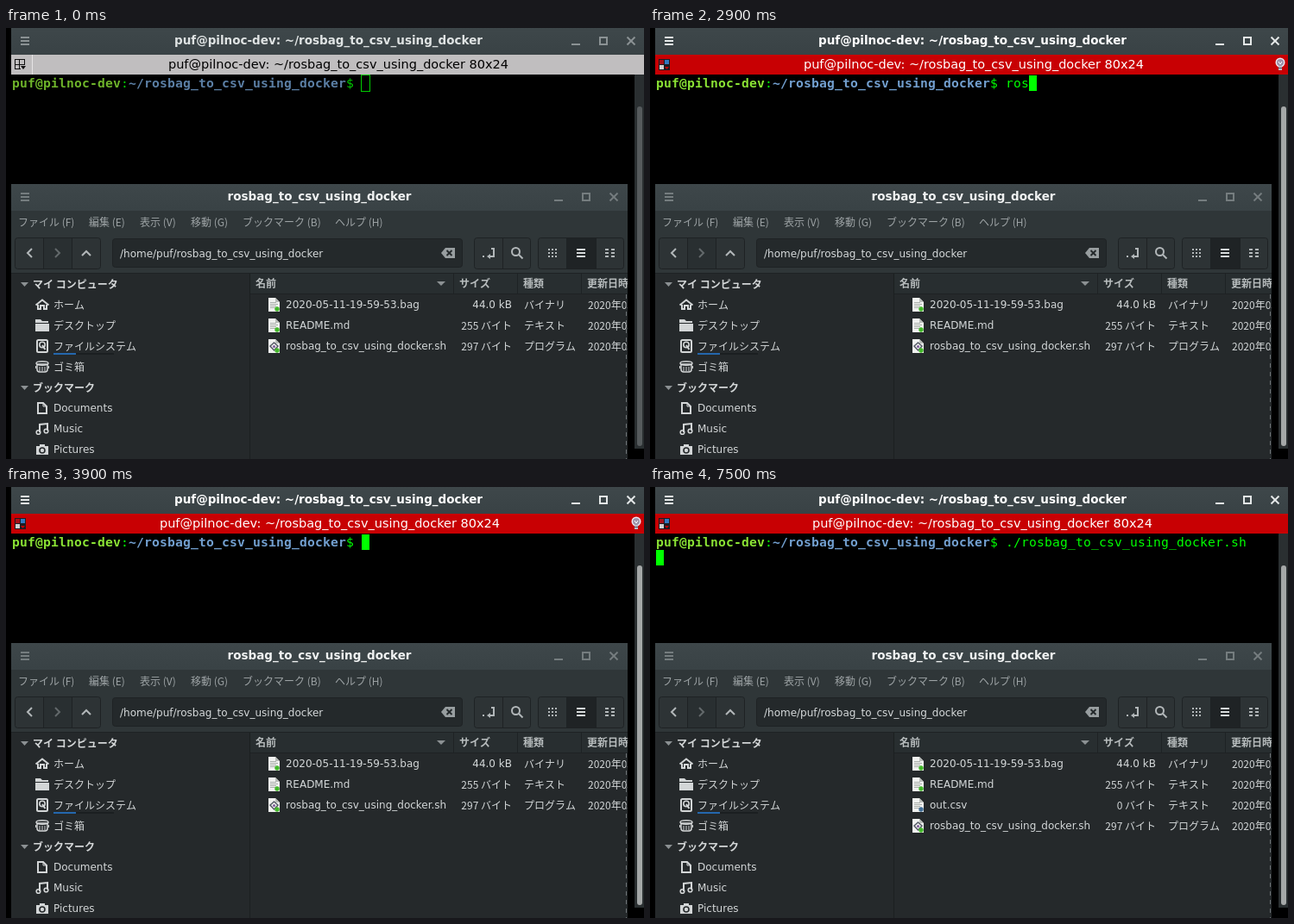
An HTML page with a canvas that plays this animation: 739x500 px, repeating every 8000 ms.

```html
<!DOCTYPE html>
<html lang="ja">
<head>
<meta charset="utf-8">
<title>Terminal and file manager</title>
<style>
html, body { margin: 0; width: 100%; height: 100%; overflow: hidden; background: #000; }
canvas { display: block; width: 739px; height: 500px; }
</style>
</head>
<body>
<canvas id="stage" width="739" height="500"></canvas>
<script>
const ctx = document.getElementById('stage').getContext('2d', { alpha: false });
const LOOP = 8000;
const SANS = '"DejaVu Sans", sans-serif';
const CJK = '"Noto Sans CJK JP", "Noto Sans CJK", sans-serif';
const MONO = '"DejaVu Sans Mono", monospace';
const DIR = 'rosbag_to_csv_using_docker';
const USER = 'puf', HOST = USER + '@pilnoc-dev';
const COMMAND = './' + DIR + '.sh ';
const CELL = 9, ROW = 18, TERM_X = 7, TERM_Y = 55;

const typed = [[0, ''], [2100, 'ro'], [2300, 'ros'], [3500, 'ro'], [3700, 'r'], [3800, ''],
  [4100, '.'], [4500, './'], [5000, './r'], [5300, './ro'], [5400, COMMAND]];
const cursorOff = [[1500, 2000], [3300, 3500], [6000, 6300], [6900, 7500]];
const bells = [[2900, 3700], [3900, 4900]];
const within = (t, spans) => spans.some(([a, b]) => t >= a && t < b);

function rect(x, y, w, h, color) {
  ctx.fillStyle = color;
  ctx.fillRect(x, y, w, h);
}

function frame(x, y, w, h, color, width = 1) {
  ctx.strokeStyle = color;
  ctx.lineWidth = width;
  ctx.strokeRect(x + width / 2, y + width / 2, w - width, h - width);
}

function path(points, color, width = 0, closed = false) {
  ctx.beginPath();
  points.forEach(([x, y]) => ctx.lineTo(x, y));
  if (closed) ctx.closePath();
  if (width) {
    ctx.strokeStyle = color;
    ctx.lineWidth = width;
    ctx.stroke();
  } else {
    ctx.fillStyle = color;
    ctx.fill();
  }
}

function circle(x, y, r, color, width = 0) {
  ctx.beginPath();
  ctx.arc(x, y, r, 0, Math.PI * 2);
  ctx.fillStyle = ctx.strokeStyle = color;
  ctx.lineWidth = width;
  width ? ctx.stroke() : ctx.fill();
}

function text(str, x, y, color, font, align = 'left') {
  ctx.font = font;
  ctx.textAlign = align;
  ctx.fillStyle = color;
  ctx.fillText(str, x, y);
}

function panel(x, y, w, h, fill, stroke) {
  ctx.beginPath();
  ctx.roundRect(x + .5, y + .5, w - 1, h - 1, 3);
  ctx.fillStyle = fill;
  ctx.fill();
  ctx.strokeStyle = stroke;
  ctx.lineWidth = 1;
  ctx.stroke();
}

function titleBar(x, y, w, title, centre, buttonsX, iconColor, textColor) {
  const shade = ctx.createLinearGradient(0, y, 0, y + 31);
  shade.addColorStop(0, '#3e474a');
  shade.addColorStop(1, '#394245');
  rect(x, y, w, 31, shade);
  const top = y + 10;
  for (let i = 0; i < 3; i++) rect(17, top + i * 4, 10, 2, iconColor);
  text(title, centre, y + 19, textColor, 'bold 13.5px ' + SANS, 'center');
  rect(buttonsX, top + 8, 10, 2, iconColor);
  frame(buttonsX + 32, top, 10, 10, iconColor, 2);
  path([[buttonsX + 64.5, top + .5], [buttonsX + 73.5, top + 9.5]], iconColor, 2);
  path([[buttonsX + 73.5, top + .5], [buttonsX + 64.5, top + 9.5]], iconColor, 2);
}

function groupIcon(active) {
  if (active) {
    rect(10, 36, 13, 13, '#1c1c22');
    rect(11, 37, 5, 5, '#a81018');
    rect(17, 37, 5, 5, '#3478c0');
    rect(11, 43, 5, 5, '#d0d0d0');
    path([[17, 45], [22, 45], [19.5, 48]], '#c80003');
  } else {
    rect(30, 31, 1, 23, '#e6e4e5');
    frame(10, 36, 12, 12, '#111', 1);
    rect(15, 36, 1, 12, '#111');
    rect(10, 42, 12, 1, '#111');
    rect(17, 43, 6, 6, '#c0bebf');
    path([[17, 44], [23, 44], [20, 48]], '#111');
  }
}

function bulb() {
  circle(730, 40, 5.5, '#eeeaf2');
  circle(730, 40, 4, '#9c90a8');
  path([[728, 39], [730, 42], [732, 39]], '#fff', 1);
  rect(728, 44, 4, 5, '#b9b9c4');
  rect(728, 46, 4, 1, '#55556a');
}

function cells(str, col, row, color, bold) {
  ctx.font = (bold ? 'bold ' : '') + '14.67px ' + MONO;
  ctx.textAlign = 'left';
  ctx.fillStyle = color;
  [...str].forEach((ch, i) =>
    ctx.fillText(ch, TERM_X + (col + i) * CELL, TERM_Y + row * ROW + 14));
  return col + str.length;
}

function terminal(t) {
  const active = t >= 900;
  const ringing = within(t, bells);
  titleBar(6, 0, 733, `${HOST}: ~/${DIR}`, 373.5, 655,
    active ? '#e4e8e8' : '#8b9294', active ? '#fff' : '#dfe3e3');
  rect(6, 31, 733, 23, active ? '#c80003' : '#c0bebf');
  groupIcon(active);
  text(`${HOST}: ~/${DIR} 80x24`, ringing ? 375 : 385, 47, active ? '#fff' : '#000',
    '14.5px ' + SANS, 'center');
  if (ringing) bulb();

  rect(728, 54, 11, 434, '#2a2f31');
  ctx.beginPath();
  ctx.roundRect(731, 91, 6, 394, 3);
  ctx.fillStyle = active ? '#a5a8a8' : '#565b5d';
  ctx.fill();

  if (t >= 2000 && t < 2100) return;
  const green = active ? '#00ff00' : '#00cc00';
  let col = cells(HOST, 0, 0, active ? '#8ae234' : '#6eb42a', true);
  col = cells(':', col, 0, green);
  col = cells('~/' + DIR, col, 0, active ? '#729fcf' : '#5b7fa5', true);
  col = cells('$ ', col, 0, green);
  col = cells(typed.findLast(([at]) => t >= at)[1], col, 0, green);
  const running = t >= 6300;
  const x = TERM_X + (running ? 0 : col) * CELL;
  const y = TERM_Y + (running ? ROW : 0);
  if (!active) frame(x - 1, y - 1, CELL + 2, ROW + 2, green);
  else if (!within(t, cursorOff)) rect(x, y, CELL, ROW, green);
}

function toolbar() {
  const line = '#1e2224', fill = '#2d3335', ink = '#b2b7b9';
  panel(10, 243, 100, 37, fill, line);
  rect(44, 244, 32, 35, '#292f31');
  rect(43, 243, 1, 37, line);
  rect(76, 243, 1, 37, line);
  path([[30, 256], [25, 261], [30, 266]], ink, 2);
  path([[57, 256], [62, 261], [57, 266]], '#63696b', 2);
  path([[88, 264], [93, 259], [98, 264]], ink, 2);

  panel(123, 244, 406, 34, '#24292b', line);
  text(`/home/${USER}/${DIR}`, 132, 266, '#d5d9da', '12px ' + SANS);
  path([[504, 261], [509, 255], [520, 255], [520, 267], [509, 267]], '#989ea0', 0, true);
  path([[510.5, 258], [516.5, 264]], '#24292b', 2);
  path([[516.5, 258], [510.5, 264]], '#24292b', 2);

  panel(542, 243, 66, 37, fill, line);
  rect(575, 243, 1, 37, line);
  path([[562, 256], [565, 256], [565, 265], [560, 265]], ink, 2);
  path([[557, 265], [561, 262], [561, 268]], ink);
  rect(552, 264, 2, 2, ink);
  circle(590.5, 259.5, 4.5, ink, 2);
  path([[594, 263], [598.5, 267.5]], ink, 2);

  panel(616, 243, 100, 37, fill, line);
  rect(650, 244, 33, 35, '#1f2325');
  rect(649, 243, 1, 37, line);
  rect(683, 243, 1, 37, line);
  for (let row = 0; row < 3; row++) {
    const y = 256 + row * 4;
    for (let c = 0; c < 3; c++) rect(628 + c * 4, y, 2, 2, ink);
    rect(661, y, 10, 2, '#d5d9da');
    rect(694, y, 4, 2, ink);
    rect(701, y, 4, 2, ink);
  }
}

const placeIcons = {
  home(y, ink) {
    path([[34.5, y + .5], [42, y - 5.5], [49.5, y + .5]], ink, 2);
    path([[37, y], [37, y + 5], [40, y + 5], [40, y + 1], [44, y + 1], [44, y + 5], [47, y + 5], [47, y]], ink, 2);
  },
  desktop(y, ink) {
    path([[34, y - 7], [40, y - 7], [42, y - 5], [49, y - 5], [49, y - 3], [34, y - 3]], ink);
    rect(34, y - 2, 16, 9, ink);
  },
  disk(y, ink) {
    ctx.beginPath();
    ctx.roundRect(36, y - 7, 12, 14, 1.5);
    ctx.strokeStyle = ink;
    ctx.lineWidth = 2;
    ctx.stroke();
    circle(42, y - 1.5, 3.2, ink, 1.6);
    path([[42, y - 1], [45.5, y + 4]], ink, 2);
  },
  trash(y, ink) {
    ctx.beginPath();
    ctx.ellipse(42, y - 4, 7, 2.2, 0, 0, Math.PI * 2);
    ctx.strokeStyle = ink;
    ctx.lineWidth = 1.5;
    ctx.stroke();
    ctx.beginPath();
    ctx.roundRect(36, y - 3, 12, 9, [0, 0, 3, 3]);
    ctx.stroke();
    path([[34.5, y - 1], [34.5, y + 2]], ink, 1);
    path([[49.5, y - 1], [49.5, y + 2]], ink, 1);
    [39, 42, 45].forEach(x => rect(x - .5, y, 1, 5, ink));
  },
  page(y, ink) {
    path([[37, y - 6], [43, y - 6], [47, y - 2], [47, y + 6], [37, y + 6]], ink, 2, true);
    path([[43, y - 6], [43, y - 2], [47, y - 2]], ink, 1);
  },
  music(y, ink) {
    path([[39, y + 4], [39, y - 5], [48, y - 6], [48, y + 2]], ink, 2);
    circle(37.5, y + 4, 2.3, ink, 1.6);
    circle(46.5, y + 2.5, 2.3, ink, 1.6);
  },
  camera(y, ink) {
    rect(35, y - 4, 14, 10, ink);
    rect(39, y - 6, 6, 3, ink);
    circle(42, y + 1, 3, '#25292b', 1.6);
  }
};

function sidebar() {
  const ink = '#d3d6d7';
  const heading = (label, y) => {
    path([[17, y - 2], [26, y - 2], [21.5, y + 3]], '#8c9193');
    text(label, 31, y + 5, ink, 'bold 12px ' + CJK);
  };
  heading('マイ コンピュータ', 297);
  heading('ブックマーク', 417);
  [['home', 'ホーム', 321], ['desktop', 'デスクトップ', 345], ['disk', 'ファイルシステム', 369],
   ['trash', 'ゴミ箱', 393], ['page', 'Documents', 441], ['music', 'Music', 465],
   ['camera', 'Pictures', 489]].forEach(([icon, label, y]) => {
    placeIcons[icon](y, ink);
    text(label, 55, y + (y > 400 ? 4 : 5), ink, '12px ' + (y > 400 ? SANS : CJK));
  });
  rect(55, 377, 26, 2, '#2467ad');
  rect(81, 377, 44, 2, '#1b1f21');
}

function fileIcon(y, kind) {
  path([[304, y - 8], [312, y - 8], [317, y - 3], [317, y + 8], [304, y + 8]], '#f1f2f0');
  path([[312, y - 8], [317, y - 3], [312, y - 3]], '#b9bdb9');
  if (kind === 'script') {
    path([[310.5, y - 4], [315, y], [310.5, y + 5], [306, y]], '#555b66', 1.5, true);
    circle(310.5, y + .5, 1.5, '#7b5a98');
  } else {
    for (let i = 0; i < 4; i++) rect(306, y - 3 + i * 2, 7 + i % 2 * 2, 1, '#a9aeaa');
  }
  circle(314, y + 5, 2.7, kind === 'new' ? '#426e96' : '#43b82a');
}

function fileRow(name, size, type, y, kind) {
  const ink = '#d3d7d8';
  fileIcon(y, kind);
  text(name, 324, y + 4, ink, '12px ' + SANS);
  const latin = size.endsWith('kB');
  text(size, 586, y + (latin ? 4 : 5), ink, '12px ' + (latin ? SANS : CJK), 'right');
  text(type, 600, y + 5, ink, '12px ' + CJK);
  text('2020年05月', 674, y + 5, ink, '12px ' + CJK);
}

function fileList(hasOutput) {
  const ink = '#b7bcbd', bold = 'bold 12px ' + CJK;
  rect(283, 285, 437, 23, '#282e30');
  rect(283, 308, 437, 1, '#1e2224');
  [518, 592, 666].forEach(x => rect(x, 285, 1, 24, '#1e2224'));
  [['名前', 289], ['サイズ', 525], ['種類', 599], ['更新日時', 673]]
    .forEach(([label, x]) => text(label, x, 301, ink, bold));
  path([[499, 294], [509, 294], [504, 299]], '#8c9193');

  fileRow('2020-05-11-19-59-53.bag', '44.0 kB', 'バイナリ', 321);
  fileRow('README.md', '255 バイト', 'テキスト', 345);
  if (hasOutput) fileRow('out.csv', '0 バイト', 'テキスト', 369, 'new');
  fileRow(DIR + '.sh', '297 バイト', 'プログラム', hasOutput ? 393 : 369, 'script');
  for (let y = 309; y < 500; y += 10) rect(718, y, 1, 5, '#6d7274');
}

function fileManager(t) {
  ctx.save();
  ctx.beginPath();
  ctx.rect(6, 181, 714, 319);
  ctx.clip();
  titleBar(6, 181, 714, DIR, 363, 635, '#757d7f', '#f0f2f2');
  rect(6, 212, 714, 73, '#2f3638');
  ['ファイル (F)', '編集 (E)', '表示 (V)', '移動 (G)', 'ブックマーク (B)', 'ヘルプ (H)']
    .forEach((label, i) =>
      text(label, [14, 96, 155, 214, 274, 381][i], 230, '#9da3a5', '12px ' + CJK));
  toolbar();
  rect(6, 284, 714, 216, '#25292b');
  rect(6, 284, 714, 1, '#1e2224');
  sidebar();
  rect(282, 285, 1, 215, '#1b1f20');
  fileList(t >= 7400);
  ctx.restore();
}

function beam(x, y) {
  rect(x - 3.5, y - 7, 7, 3, '#000');
  rect(x - 3.5, y + 4, 7, 3, '#000');
  rect(x - 1.5, y - 6, 3, 12, '#000');
  rect(x - 2.5, y - 6, 5, 1, '#fff');
  rect(x - 2.5, y + 5, 5, 1, '#fff');
  rect(x - .5, y - 6, 1, 12, '#fff');
}

function arrow(x, y) {
  const shape = [[x, y], [x, y + 14], [x + 3.5, y + 11], [x + 6, y + 16], [x + 8, y + 15],
    [x + 6, y + 10], [x + 10, y + 10]];
  path(shape, '#111', 0, true);
  path(shape, '#fff', 1, true);
}

function pointer(t) {
  if (t < 400 || t >= 2000) return;
  const step = Math.min(3, Math.floor((t - 400) / 100)) / 3;
  const eased = 1 - (1 - step) ** 2;
  const x = Math.round(463 + 34 * eased) + .5;
  const y = Math.round(266 - 144 * eased);
  y > 180 && y < 244 ? arrow(x, y) : beam(x, y);
}

function draw(t) {
  rect(0, 0, 739, 500, '#000');
  terminal(t);
  fileManager(t);
  if (t >= 3800 && t < 3900) rect(0, 264, 739, 236, '#000');
  pointer(t);
}

const start = performance.now();
function tick() {
  draw((performance.now() - start) % LOOP);
  requestAnimationFrame(tick);
}
tick();
</script>
</body>
</html>
```
